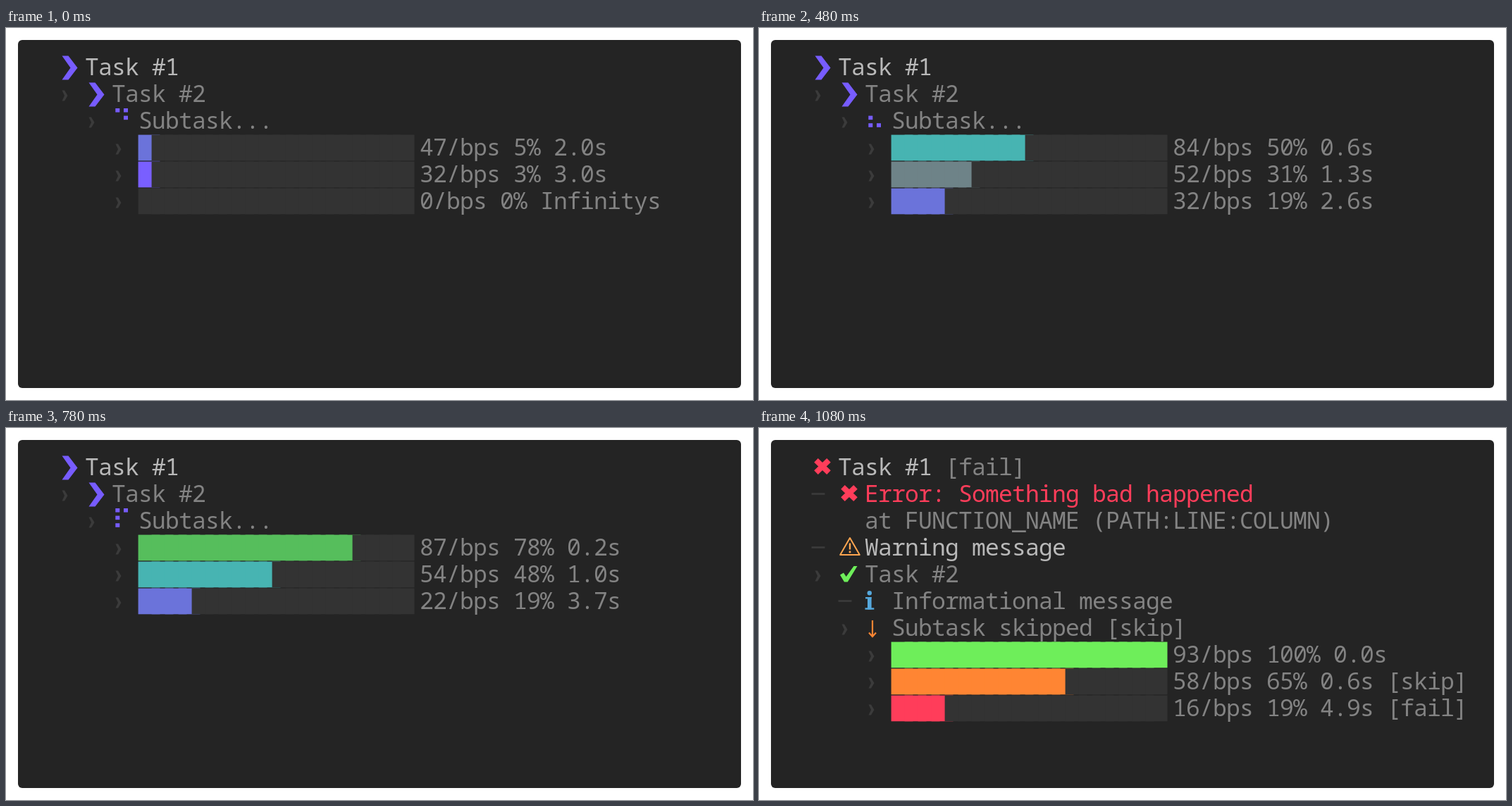
Write an HTML page with a canvas that moves like this. It is 1060 px wide and 528 px high and loops after 8.2 s.

```html
<!DOCTYPE html>
<html lang="en">
<head>
<meta charset="utf-8">
<title>Task list</title>
<style>
html, body { margin: 0; width: 100%; height: 100%; overflow: hidden; background: #fff; }
canvas { display: block; width: 1060px; height: 528px; }
</style>
</head>
<body>
<canvas id="stage" width="1060" height="528"></canvas>
<script>
const ctx = document.getElementById('stage').getContext('2d');
const CELL = 19, ROW = 38, LEFT = 112, LOOP = 8200, DONE = 1080;
const BRIGHT = '#b9b9b9', DIM = '#838383', FAINT = '#3b3b3b', TRACK = '#333333';
const PURPLE = '#775cff', RED = '#ff3d5a', ORANGE = '#ff8533', GREEN = '#6eee5a';

// rate, percent, seconds left for each of the three bars
const STEPS = [
  '47 5 2.0|32 3 3.0|0 0 Infinity',
  '75 15 1.1|45 9 2.0|5 1 19.8',
  '90 27 0.8|51 15 1.7|7 2 14.2',
  '83 33 0.8|50 20 1.6|20 8 4.6',
  '84 42 0.7|52 26 1.4|28 14 3.1',
  '84 50 0.6|52 31 1.3|32 19 2.6',
  '84 58 0.5|54 37 1.2|28 19 2.9',
  '85 67.5 0.4|54 43 1.0|25 19 3.3',
  '87 78 0.2|54 48 1.0|22 19 3.7',
  '91 89 0.1|58 57 0.7|20 19 4.1',
  '93 100 0.0|59 65 0.6|18 19 4.5',
  '93 100 0.0|58 65 0.6|16 19 4.9'
].map(s => s.split('|').map(b => b.split(' ')));

const SPIN = '⠙⠹⠸⠼⠴⠦⠧⠇⠏⠋';

const SHADES = [
  [5, '#795fff'], [24, '#6b73da'], [45, '#6e8388'], [56, '#47b4b2'],
  [72, '#52ba87'], [95, '#56be5c'], [101, GREEN]
];

function text(str, col, row, color) {
  ctx.fillStyle = color;
  ctx.fillText(str, LEFT + col * CELL, 67 + row * ROW);
}

// Filled polygon, shifted by whole columns and rows
function poly(points, col, row, color) {
  ctx.fillStyle = color;
  ctx.beginPath();
  for (let i = 0; i < points.length; i += 2) {
    ctx.lineTo(points[i] + col * CELL, points[i + 1] + row * ROW);
  }
  ctx.fill();
}

function lines(segments, color, width) {
  ctx.strokeStyle = color;
  ctx.lineWidth = width;
  ctx.beginPath();
  for (const [x, y, ...rest] of segments) {
    ctx.moveTo(x, y);
    for (let i = 0; i < rest.length; i += 2) ctx.lineTo(rest[i], rest[i + 1]);
  }
  ctx.stroke();
}

function pointer(col, row) {
  poly([79.5, 39.5, 88.5, 39.5, 101.5, 56.5, 88.5, 73.5, 79.5, 73.5, 91.5, 56.5], col, row, PURPLE);
}

function bullet(col, row) {
  poly([79.5, 50.5, 83, 50.5, 87.5, 58, 83, 65.5, 79.5, 65.5, 83, 58], col, row, FAINT);
}

function dash(col, row) {
  ctx.fillStyle = FAINT;
  ctx.fillRect(74.5 + col * CELL, 54.2 + row * ROW, 19, 2.6);
}

function cross(col, row) {
  const x = 90 + col * CELL, y = 54.5 + row * ROW;
  lines([[x - 9, y - 8.7, x + 9, y + 8.7], [x - 9, y + 8.7, x + 9, y - 8.7]], RED, 8);
}

function spinner(step) {
  const bits = SPIN.charCodeAt(step % SPIN.length) - 0x2800;
  ctx.fillStyle = PURPLE;
  for (let i = 0; i < 6; i++) {
    if (bits >> i & 1) {
      ctx.fillRect(155.3 + Math.floor(i / 3) * 11.7, 114 + i % 3 * 10.6, 6, 5.6);
    }
  }
}

// Blocks are wider than a cell, so each one overlaps the next
function bar([rate, pct, eta], row, color, note = '') {
  const full = Math.round(pct / 5);
  const shade = color || SHADES.find(s => pct < s[0])[1];
  bullet(4, row);
  for (let i = 0; i < 20; i++) {
    ctx.fillStyle = i < full ? shade : TRACK;
    ctx.fillRect(187.6 + i * CELL, 37.6 + row * ROW, 30.9, 36.7);
  }
  text(`${rate}/bps ${Math.floor(pct)}% ${eta}s${note}`, 25, row, DIM);
}

function running(step) {
  pointer(0, 0);
  text('Task #1', 0, 0, BRIGHT);
  bullet(0, 1);
  pointer(2, 1);
  text('Task #2', 2, 1, DIM);
  bullet(2, 2);
  spinner(step);
  text('Subtask...', 4, 2, DIM);
  STEPS[step].forEach((b, i) => bar(b, 3 + i));
}

function warning() {
  ctx.lineJoin = 'round';
  lines([[129, 156, 142.8, 180, 115.2, 180, 129, 156, 130, 157.8]], '#ffa650', 2);
  lines([[129, 163.5, 129, 172.5]], '#ffa650', 2.4);
  ctx.fillRect(127.7, 174.5, 2.6, 2.8);
  ctx.lineJoin = 'miter';
}

function info() {
  ctx.fillStyle = '#55a8dc';
  ctx.beginPath();
  ctx.arc(156.8, 234.2, 3.2, 0, 7);
  ctx.fill();
  ctx.fillRect(151, 240, 8.6, 2.4);
  ctx.fillRect(154, 240, 5.6, 17.5);
  ctx.fillRect(150.5, 255.3, 12.8, 2.4);
}

function finished() {
  cross(0, 0);
  text('Task #1', 0, 0, BRIGHT);
  text('[fail]', 8, 0, DIM);
  dash(0, 1);
  cross(2, 1);
  text('Error: Something bad happened', 2, 1, RED);
  text('at FUNCTION_NAME (PATH:LINE:COLUMN)', 2, 2, DIM);
  dash(0, 3);
  ctx.fillStyle = '#ffa650';
  warning();
  text('Warning message', 2, 3, BRIGHT);
  bullet(0, 4);
  poly([115, 208.5, 120, 205.5, 123.7, 211, 134.5, 196, 139.5, 196, 125.8, 218.5, 121, 218.5], 0, 0, GREEN);
  text('Task #2', 2, 4, DIM);
  dash(2, 5);
  info();
  text('Informational message', 4, 5, DIM);
  bullet(2, 6);
  lines([[161, 273, 161, 296], [156, 290.5, 161, 296, 166, 290.5]], ORANGE, 2.2);
  text('Subtask skipped [skip]', 4, 6, DIM);
  const [a, b, c] = STEPS[11];
  bar(a, 7);
  bar(b, 8, ORANGE, ' [skip]');
  bar(c, 9, RED, ' [fail]');
}

function draw(ms) {
  ctx.fillStyle = '#fff';
  ctx.fillRect(0, 0, 1060, 528);
  ctx.fillStyle = '#242424';
  ctx.beginPath();
  ctx.roundRect(17, 17, 1026, 494, 6);
  ctx.fill();
  ctx.font = '33px "Noto Sans Mono", "DejaVu Sans Mono", monospace';
  ctx.letterSpacing = '0px';
  ctx.letterSpacing = CELL - ctx.measureText('0').width + 'px';
  if (ms < DONE) running(Math.floor((ms + 20) / 100));
  else finished();
}

const start = performance.now();
function tick() {
  draw((performance.now() - start) % LOOP);
  requestAnimationFrame(tick);
}
tick();
</script>
</body>
</html>
```
